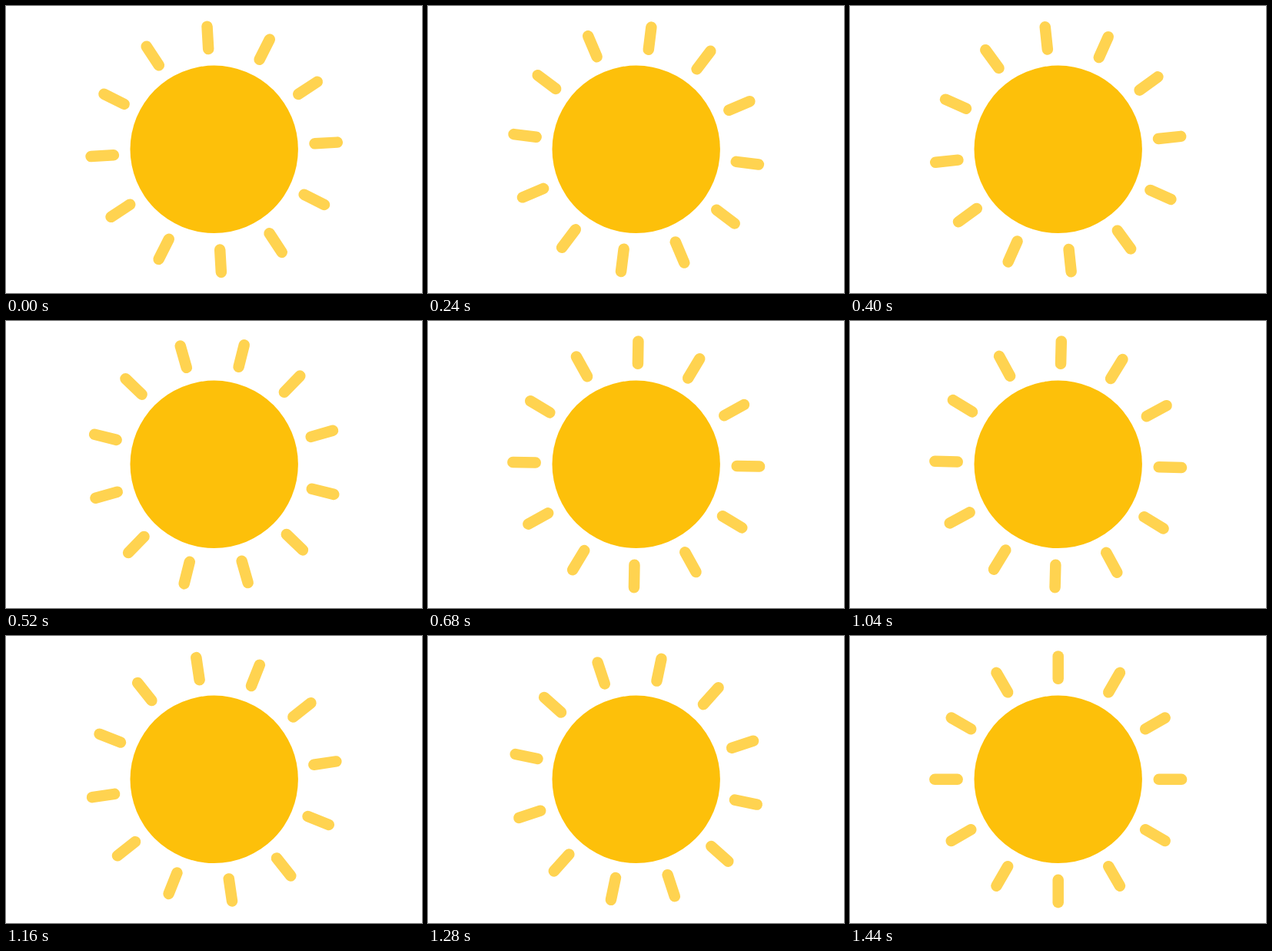
These frames come from a looping animation (541 px wide and 374 px high, 1480 ms). An HTML page:

```html
<!DOCTYPE html>
<html lang="en">
<head>
<meta charset="utf-8">
<title>Turning sun</title>
<style>
  html, body { margin: 0; width: 100%; height: 100%; overflow: hidden; background: #fff; }
  svg { display: block; width: 100%; height: 100%; }
</style>
</head>
<body>
<svg viewBox="0 0 541 374">
  <g transform="translate(270.7 186.8)">
    <g id="rays" stroke="#ffd350" stroke-width="14.5" stroke-linecap="round"></g>
    <circle r="109.2" fill="#fdc00a"/>
  </g>
</svg>
<script>
const LOOP = 1480;
const STEP = 40;
const DEG_PER_STEP = 3.279;
const TURN = 120;
const RAYS = 12;
const INNER = 131;
const OUTER = 160.4;

const rays = document.getElementById('rays');
for (let i = 0; i < RAYS; i++) {
  const line = document.createElementNS('http://www.w3.org/2000/svg', 'line');
  line.setAttribute('y1', -INNER);
  line.setAttribute('y2', -OUTER);
  line.setAttribute('transform', `rotate(${i * 360 / RAYS})`);
  rays.appendChild(line);
}

// Steady counter-clockwise turn in 40 ms steps, stopping at a full third.
function draw(ms) {
  const step = Math.floor((ms % LOOP) / STEP) + 1;
  const angle = -Math.min(TURN, step * DEG_PER_STEP);
  rays.setAttribute('transform', `rotate(${angle})`);
}

const start = performance.now();
function tick() {
  draw(performance.now() - start);
  requestAnimationFrame(tick);
}
tick();
</script>
</body>
</html>
```
